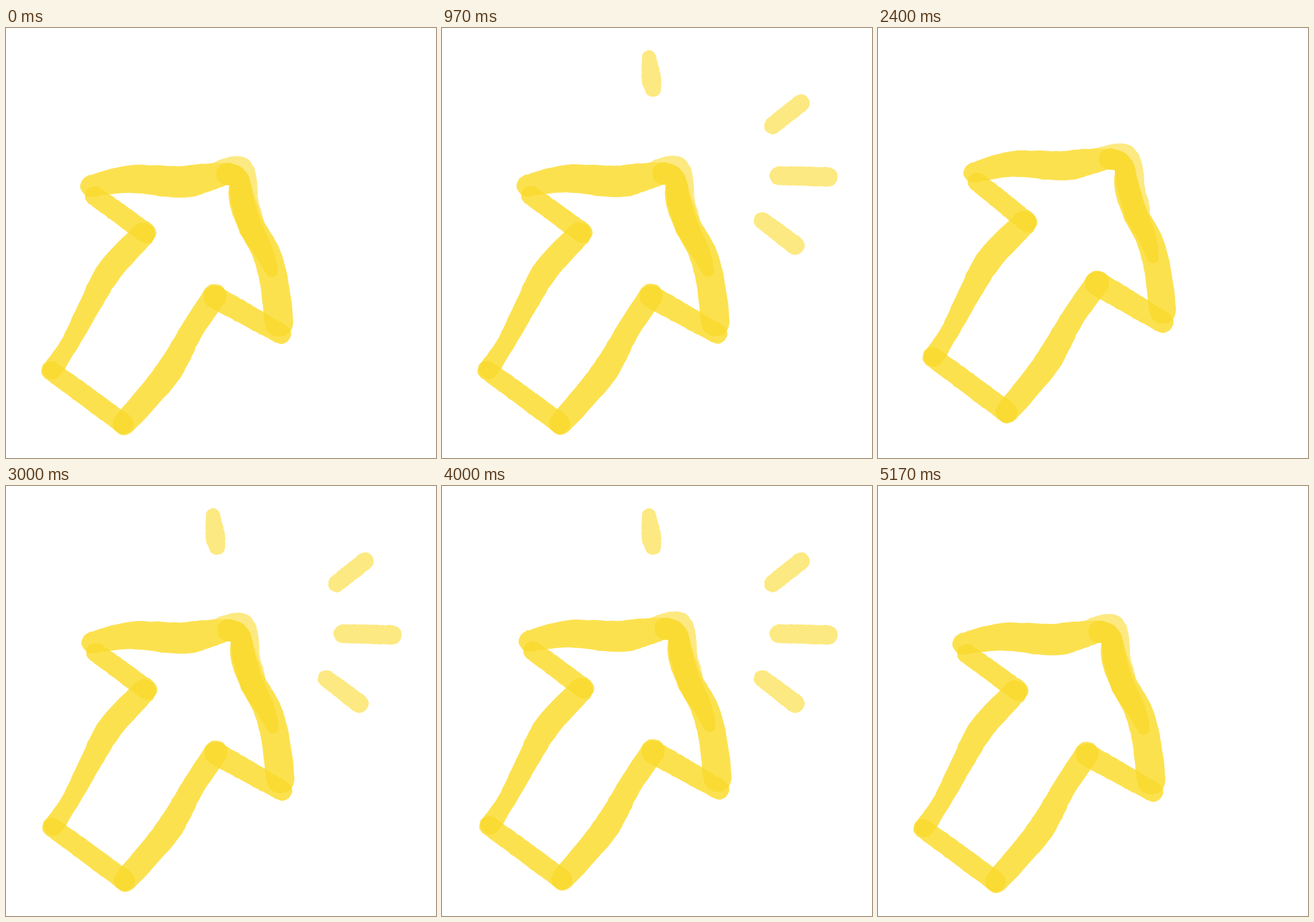
Write an HTML page with a canvas that moves like this. It is 748x748 px and loops after 5210 ms.

```html
<!DOCTYPE html>
<html lang="en">
<head>
<meta charset="utf-8">
<title>Marker arrow</title>
<style>
html, body { margin: 0; width: 100%; height: 100%; overflow: hidden; background: #fff; }
canvas { display: block; width: 748px; height: 748px; }
</style>
</head>
<body>
<canvas id="stage" width="748" height="748"></canvas>
<script>
const LOOP = 5210, CYCLE = 1046;
const RAYS_ON = 598, RAYS_OFF = 976;
const LIGHT = '#fde981', MAIN = '#fce14f', DARK = '#f9db33';
const SAMPLES = 32;
const ctx = document.getElementById('stage').getContext('2d');

// line: [x, y, half width] at rest; from, to: travel of both ends at full reach;
// bow: extra travel of the middle; swell: relative change of width.
const strokes = {
  glow: { line: [[375, 249, 20], [405, 245, 22], [416, 264, 20], [418, 300, 21], [430, 335, 18]],
    from: [38, -55], to: [62, -48], bow: [8, 0], swell: -0.05 },
  top: { line: [[148, 275, 19], [215, 263, 24], [300, 268, 27.5], [340, 262, 26], [378, 254, 20]],
    from: [43, -55], to: [41, -62], bow: [0, -8], swell: -0.17 },
  right: { line: [[406, 264, 18], [411, 300, 23], [427, 345, 23], [452, 390, 24], [466, 440, 25], [475, 512, 25]],
    from: [56, -54], to: [48, -50], bow: [-4, 0], swell: -0.15 },
  barbLeft: { line: [[154, 292, 17], [243, 356, 18]],
    from: [44, -58], to: [38, -45], bow: [0, 0], swell: -0.04 },
  shaftLeft: { line: [[238, 359, 21], [180, 422, 22], [147, 480, 19], [113, 545, 16], [81, 594, 17]],
    from: [38, -47], to: [39, -54], bow: [-6, 0], swell: 0.06 },
  base: { line: [[78, 596, 17], [204, 688, 18]],
    from: [40, -56], to: [46, -49], bow: [0, 0], swell: 0.1 },
  shaftRight: { line: [[363, 466, 21], [322, 528, 20], [298, 572, 22], [272, 612, 23], [206, 688, 20]],
    from: [44, -55], to: [45, -49], bow: [-10, 0], swell: 0 },
  barbRight: { line: [[363, 468, 20], [478, 532, 17.5]],
    from: [43, -56], to: [40, -49], bow: [0, 0], swell: 0.18 },
  retrace: { line: [[385, 254, 20], [404, 262, 18], [411, 300, 20], [425, 345, 20], [448, 388, 17], [462, 422, 11]],
    from: [42, -62], to: [38, -55], bow: [16, 0], swell: -0.12 }
};
const body = ['top', 'right', 'barbLeft', 'shaftLeft', 'base', 'shaftRight', 'barbRight'];
const joints = [['top', 'barbLeft'], ['barbLeft', 'shaftLeft'], ['shaftLeft', 'base'],
  ['base', 'shaftRight'], ['shaftRight', 'barbRight'], ['barbRight', 'right']];

const rays = [
  [[360, 51, 12.5], [364, 88, 17], [367, 105, 14.5]],
  [[575, 170, 15], [624, 131, 15.5]],
  [[586, 257, 16.5], [671, 259, 17]],
  [[557, 335, 15], [614, 378, 16.5]]
].map(line => brush(line));

function jitter(n) {
  const s = Math.sin(n * 12.9898) * 43758.5453;
  return (s - Math.floor(s) - 0.5) * 1.3;
}

function spline(a, b, c, d, t) {
  return b + t / 2 * (c - a + t * (2 * a - 5 * b + 4 * c - d + t * (3 * (b - c) + d - a)));
}

function pointAt(line, t) {
  const last = line.length - 1;
  const i = Math.min(Math.floor(t * last), last - 1);
  const key = k => line[Math.max(0, Math.min(last, k))];
  return [0, 1, 2].map(axis =>
    spline(key(i - 1)[axis], key(i)[axis], key(i + 1)[axis], key(i + 2)[axis], t * last - i));
}

// Round-ended stroke of varying width with a slightly ragged edge.
function brush(line) {
  const path = new Path2D();
  let id = 1;
  const edge = ([x, y, w], angle) => {
    const r = w + jitter(id++);
    path.lineTo(x + r * Math.cos(angle), y + r * Math.sin(angle));
  };
  const heading = t => {
    const [a, b] = [pointAt(line, Math.max(0, t - 0.01)), pointAt(line, Math.min(1, t + 0.01))];
    return Math.atan2(b[1] - a[1], b[0] - a[0]);
  };
  for (const back of [false, true]) {
    for (let k = 0; k <= SAMPLES; k++) {
      const t = back ? 1 - k / SAMPLES : k / SAMPLES;
      edge(pointAt(line, t), heading(t) + (back ? Math.PI / 2 : -Math.PI / 2));
    }
    const end = back ? 0 : 1;
    const turn = heading(end) + (back ? Math.PI / 2 : -Math.PI / 2);
    for (let k = 1; k < 10; k++) edge(pointAt(line, end), turn + k / 10 * Math.PI);
  }
  path.closePath();
  return path;
}

function pose({ line, from, to, bow, swell }, y) {
  return line.map(([px, py, w], i) => {
    const t = i / (line.length - 1), mid = Math.sin(t * Math.PI);
    const move = axis => y * (from[axis] + (to[axis] - from[axis]) * t + bow[axis] * mid);
    return [px + move(0), py + move(1), w * (1 + swell * y)];
  });
}

// Speeds up into the hit, then rebounds and settles.
function reach(phase) {
  const half = CYCLE / 2;
  return phase < half ? (phase / half) ** 1.68 : (2 - phase / half) ** 2.3;
}

function fill(path, color) {
  ctx.fillStyle = color;
  ctx.fill(path);
}

function draw(time) {
  const phase = time % LOOP % CYCLE, y = reach(phase) * 1.02;
  const paths = {};
  for (const name in strokes) paths[name] = brush(pose(strokes[name], y));
  ctx.fillStyle = '#fff';
  ctx.fillRect(0, 0, 748, 748);
  fill(paths.glow, LIGHT);
  body.forEach(name => fill(paths[name], MAIN));
  joints.forEach(([a, b]) => {
    ctx.save();
    ctx.clip(paths[a]);
    fill(paths[b], DARK);
    ctx.restore();
  });
  fill(paths.retrace, DARK);
  if (phase >= RAYS_ON && phase < RAYS_OFF) rays.forEach(ray => fill(ray, LIGHT));
}

const start = performance.now();
function tick() {
  draw(performance.now() - start);
  requestAnimationFrame(tick);
}
tick();
</script>
</body>
</html>
```
